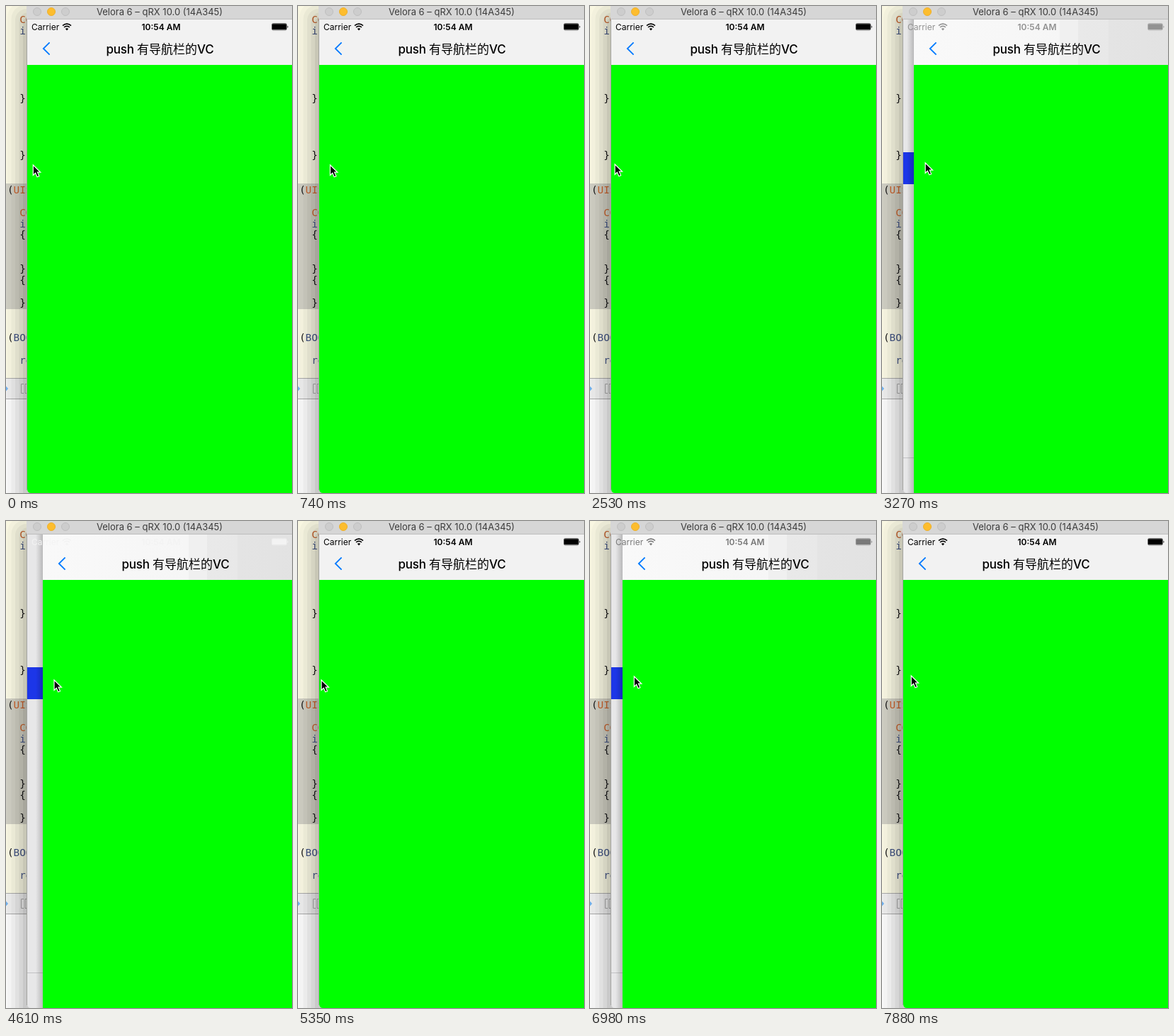
An HTML page that plays this animation: 404 px wide and 686 px high, repeating every 8000 ms.

```html
<!DOCTYPE html>
<html lang="en">
<head>
<meta charset="utf-8">
<title>Swipe back</title>
<style>
html, body { margin: 0; width: 100%; height: 100%; overflow: hidden; background: #f4f4f4; }
svg { display: block; width: 404px; height: 686px; }
text { white-space: pre; }
.ui { font-family: Inter, "Noto Sans CJK SC", "Noto Sans CJK", sans-serif; }
.code { font: 14.3px "DejaVu Sans Mono", monospace; }
</style>
</head>
<body>
<svg viewBox="0 0 404 686" xmlns="http://www.w3.org/2000/svg">
  <defs>
    <clipPath id="screen"><path d="M30 19H404V686H35Q30 686 30 680Z"/></clipPath>
    <linearGradient id="edge"><stop stop-opacity="0"/><stop offset="1" stop-opacity=".2"/></linearGradient>
    <linearGradient id="bar" gradientUnits="userSpaceOnUse" x1="30" x2="404">
      <stop stop-color="#f9f9f9"/><stop offset=".55" stop-color="#f6f6f6"/>
      <stop offset=".55" stop-color="#f0f0f0"/><stop offset=".62" stop-color="#f0f0f0"/>
      <stop offset=".62" stop-color="#e9e9e9"/><stop offset=".735" stop-color="#e8e8e8"/>
      <stop offset=".735" stop-color="#e4e4e4"/><stop offset="1" stop-color="#e2e2e2"/>
    </linearGradient>
  </defs>

  <!-- editor behind the window -->
  <path fill="#f9f7e2" d="M0 0H60V525H0Z"/>
  <path fill="#cfcec3" d="M0 250H60V427H0Z"/>
  <path fill="#ededed" d="M0 525H60V553H0Z"/>
  <path fill="#fafafa" d="M0 553H60V686H0Z"/>
  <path stroke="#a9a9a9" d="M0 524.5H60M0 553.5H60"/>
  <g id="code" class="code"></g>
  <path fill="#6fb0ee" d="M0 535.5L3 539L0 542.5Z"/>
  <path fill="none" stroke="#a8a8a8" d="M25 532.5H21.5V545.5H25M27 532.5H32V545.5H27Z"/>
  <g id="shade"></g>

  <!-- window -->
  <path fill="#d6d6d6" d="M29 0H404V19H29Z"/>
  <path fill="#bdbdbd" d="M29 18H404V19H29Z"/>
  <g fill="#cdcdcd" stroke="#bfbfbf">
    <circle cx="44" cy="8" r="5.5"/><circle cx="84" cy="8" r="5.5"/>
    <circle cx="64" cy="8" r="5.5" fill="#fdbd2e" stroke="#eeb02a"/>
  </g>
  <text class="ui" x="217" y="13" font-size="13" text-anchor="middle" fill="#3b3b3b">Velora 6 – qRX 10.0 (14A345)</text>
  <path stroke="#a3a3a0" d="M29.5 19V682"/>

  <g clip-path="url(#screen)">
    <path fill="#e7e7e8" d="M30 19H404V686H30Z"/>
    <path fill="#1c36e8" d="M30 206H404V251H30Z"/>
    <path stroke="#c2c2c4" d="M30 636.5H404"/>
    <g id="pane">
      <path id="shadow" fill="url(#edge)" d="M20 19H30V686H20Z"/>
      <path id="nav" d="M30 19H404V83H30Z"/>
      <path fill="#0f0" d="M30 83H404V686H30Z"/>
      <path fill="none" stroke="#007aff" stroke-width="1.8" d="M61.6 51.3L52.8 60L61.6 68.7"/>
      <text class="ui" x="217.5" y="67" font-size="17" font-weight="500" text-anchor="middle"><tspan letter-spacing="-.25">push </tspan>有导航栏的<tspan letter-spacing="-.25">VC</tspan></text>
    </g>
    <g id="status" class="ui">
      <text x="36" y="33.5" font-size="12">Carrier</text>
      <text x="219" y="33.5" font-size="12" font-weight="600" text-anchor="middle">10:54 AM</text>
      <path d="M86 34.5L83.8 32Q86 30.3 88.2 32Z"/>
      <path fill="none" stroke="currentColor" stroke-width="1.6" d="M82 30Q86 26.7 90 30M80 27.6Q86 22.6 92 27.6"/>
      <rect x="375.5" y="24.5" width="21" height="9.5" rx="2" fill="none" stroke="currentColor" stroke-opacity=".5"/>
      <rect x="376" y="25.3" width="20" height="8" rx="1"/>
      <path d="M397.5 27.5Q399.5 29.3 397.5 31Z"/>
    </g>
  </g>

  <path id="cursor" stroke="#fff" stroke-width="1.2" d="M0 0V14.3L3.3 11.3L5.7 16.8L8.5 15.6L6.1 10.2H10.4Z"/>
</svg>
<script>
const $ = id => document.getElementById(id);
const LOOP = 8000, STEP = 148.65;  // the picture is renewed once per step
const HOME = 33, GRAB = 46;        // cursor x at rest, and where the drag begins
const REACH_STEPS = 3, BACK_STEPS = 3, SNAP_STEPS = 2;

const BLACK = '#161616', ORANGE = '#c9622c', BLUE = '#3f5282';
const code = [
  [2, 24, 'CG', ORANGE], [2, 40, 'if', BLUE], [2, 135, '}'], [2, 215, '}'],
  [0, 264, '('], [1, 264, 'UIS', ORANGE], [2, 296, 'CG', ORANGE], [2, 312, 'if', BLUE],
  [2, 327, '{'], [2, 375, '};'], [2, 391, '{'], [2, 423, '}'],
  [0, 472, '('], [1, 472, 'BOO', BLUE], [2, 504, 're', BLUE]
];
$('code').innerHTML = code.map(([col, y, text, fill = BLACK]) =>
  `<text x="${2 + col * 8.6}" y="${y}" fill="${fill}">${text}</text>`).join('');

// the window's soft shadow, in nested steps
$('shade').innerHTML = Array.from({ length: 5 }, (_, i) =>
  `<rect x="${2 + i * 5.5}" y="${i * 5 - 6}" width="420" height="760" rx="${22 - i * 3}" fill-opacity="${.025 + i * .009}"/>`).join('');

// times in steps; reach is the cursor's furthest x
const swipes = [
  { start: -.3, release: 3, end: 7, reach: 61, y: 224 },
  { start: 8, release: 15, end: 18, reach: 52, y: 223 },
  { start: 19.8, release: 22, end: 26, reach: 63.3, y: 221 },
  { start: 28, release: 33, end: 36, reach: 68, y: 224 },
  { start: 37, release: 39, end: 44, reach: 67, y: 222 },
  { start: 45, release: 48, end: 51, reach: 66, y: 219 },
  { start: 52.6, release: 55, end: 60, reach: 66, y: 218 }
];

const clamp = u => Math.min(1, Math.max(0, u));
const easeOut = u => 1 - (1 - clamp(u)) ** 2;

function cursorX({ start, end, reach }, step) {
  const out = easeOut((step - start) / REACH_STEPS);
  const back = easeOut((step - end + BACK_STEPS) / BACK_STEPS);
  return HOME + (reach - HOME) * out * (1 - back);
}

function paneOffset(swipe, step) {
  const held = Math.max(0, cursorX(swipe, Math.min(step, swipe.release)) - GRAB);
  return Math.round(held * (1 - easeOut((step - swipe.release) / SNAP_STEPS)));
}

// 0 is the dark status bar, 1 the light one
function statusLight({ start, release }, step) {
  return clamp((Math.min(step, release) - start - 1) / 2.1) * (1 - clamp((step - release) / SNAP_STEPS));
}

function draw(time) {
  const step = Math.floor((time % LOOP + 6) / STEP);
  const swipe = swipes.findLast(s => s.start <= step);
  const offset = paneOffset(swipe, step);
  const tone = Math.round(255 * statusLight(swipe, step));
  const ink = `rgb(${tone},${tone},${tone})`;

  $('cursor').setAttribute('transform', `translate(${cursorX(swipe, step)} ${swipe.y})`);
  $('pane').setAttribute('transform', `translate(${offset})`);
  $('nav').setAttribute('fill', offset ? 'url(#bar)' : '#f2f2f2');
  $('shadow').setAttribute('opacity', offset ? 1 : 0);
  $('status').setAttribute('fill', ink);
  $('status').setAttribute('color', ink);
}

const begin = performance.now();
function tick() {
  draw(performance.now() - begin);
  requestAnimationFrame(tick);
}
tick();
</script>
</body>
</html>
```
